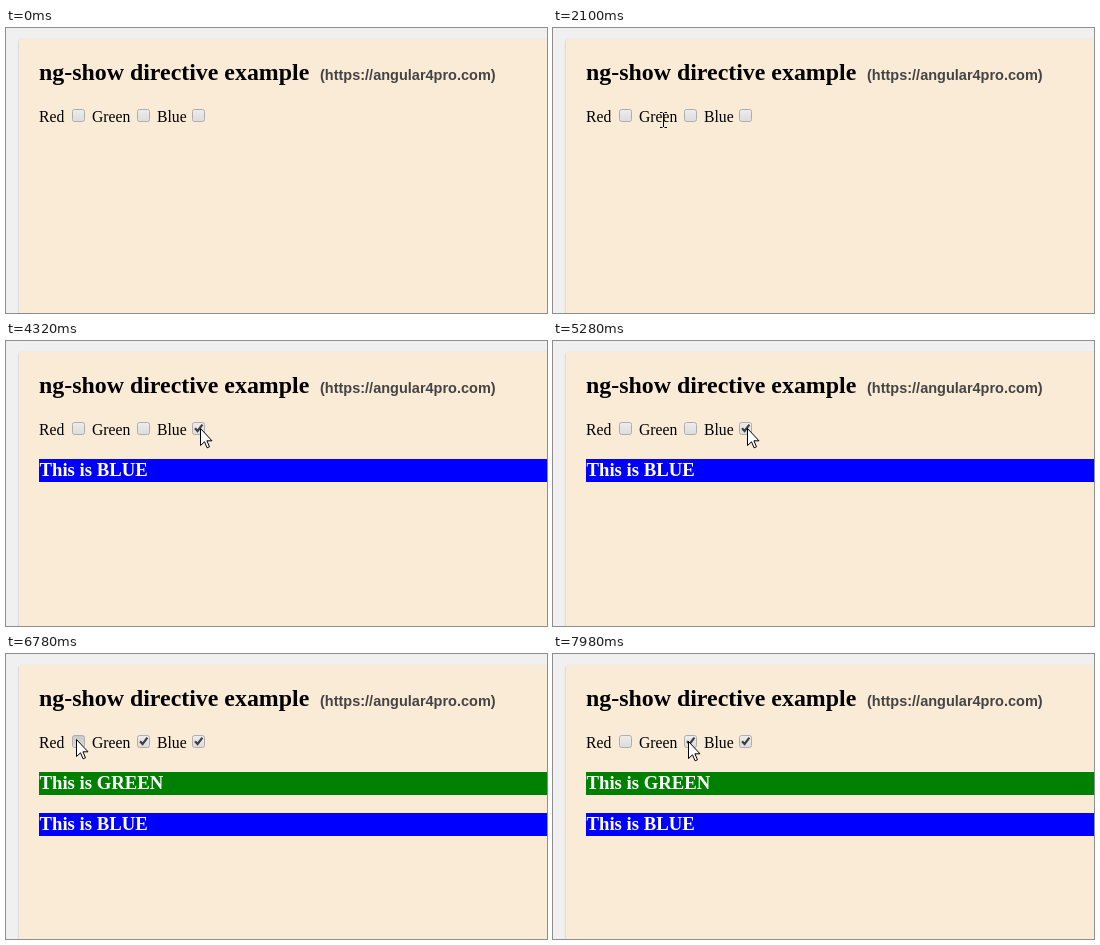
An HTML page that plays this animation: 541x285 px, repeating every 8 s.

```html
<!DOCTYPE html>
<html lang="en">
<head>
<meta charset="utf-8">
<title>ng-show directive example</title>
<style>
  html, body { margin: 0; width: 100%; height: 100%; overflow: hidden; background: #f0f0f0; }
  body { position: relative; font: 15.7px "Liberation Serif", "Times New Roman", serif; color: #000; }
  .card { position: absolute; left: 13px; top: 11px; right: -10px; bottom: -10px;
    background: #faebd7; border-radius: 2px; box-shadow: 0 1px 2px rgba(0, 0, 0, .3); }
  svg { position: absolute; left: 0; top: 0; }
  .title { font-size: 23.9px; font-weight: bold; }
  .site { font: bold 14.5px "Liberation Sans", Arial, sans-serif; fill: #444; }
  .bar text { font-size: 18.72px; font-weight: bold; fill: #fff; }
  .box { stroke: #b0aeab; }
  .tick { fill: none; stroke: #3c4043; stroke-width: 2.2; }
</style>
</head>
<body>
<div class="card"></div>
<svg width="541" height="285" viewBox="0 0 541 285">
  <defs>
    <linearGradient id="idle" x2="0" y2="1"><stop stop-color="#ededed"/><stop offset="1" stop-color="#dcdcdc"/></linearGradient>
    <linearGradient id="pressed" x2="0" y2="1"><stop stop-color="#c8c8c8"/><stop offset="1" stop-color="#dcdcdc"/></linearGradient>
  </defs>
  <text class="title" x="33" y="52">ng-show directive example</text>
  <text class="site" x="314" y="52">(https://angular4pro.com)</text>
  <g id="options"></g>
  <g id="cursor">
    <path id="arrow" d="M.5 .5v17l4-3.7 2.6 6 2.4-1-2.6-6h5.1z" fill="#fff" stroke="#000"/>
    <path id="beam" d="M-3 -7.5h2.5M1.5 -7.5h2.5M.5 -7v14M-3 7.5h2.5M1.5 7.5h2.5" fill="none" stroke="#000"/>
  </g>
</svg>
<script>
const LOOP = 8000, STEP = 60, PRESS = 120, SAG = 5;
const $ = id => document.getElementById(id);

const options = [
  { name: 'Red', color: '#f00', x: 33, box: 66 },
  { name: 'Green', color: '#008000', x: 86, box: 131 },
  { name: 'Blue', color: '#00f', x: 151, box: 186 },
];

const easeOut = k => 1 - (1 - k) ** 2;
const easeOutBack = k => 1 + 2.7 * (k - 1) ** 3 + 1.7 * (k - 1) ** 2;

// The pointer travels to each checkbox, then toggles it at the given times.
const entry = { x: 395, y: 153 };
const visits = [
  { option: 0, leave: 120, arrive: 900, x: 74, y: 88, toggles: [1200, 1740], ease: easeOutBack },
  { option: 1, leave: 1860, arrive: 2580, x: 139, y: 87, toggles: [2760, 3120] },
  { option: 2, leave: 3360, arrive: 3780, x: 194, y: 87, toggles: [4080, 4680, 5280] },
  { option: 1, leave: 5280, arrive: 5940, x: 137, y: 90, toggles: [6000] },
  { option: 0, leave: 6000, arrive: 6780, x: 70, y: 85, toggles: [6900, 7560] },
  { option: 1, leave: 7560, arrive: 7980, x: 135, y: 87, toggles: [] },
];

$('options').innerHTML = options.map(o => `
  <text x="${o.x}" y="94">${o.name}</text>
  <rect class="box" x="${o.box + .5}" y="81.5" width="12" height="12" rx="2"/>
  <path class="tick" d="M${o.box + 3} 87.2l2.6 2.8 4.8-6.3"/>
  <g class="bar">
    <rect x="33" width="508" height="23" fill="${o.color}"/>
    <text x="33.5" y="17">This is ${o.name.toUpperCase()}</text>
  </g>`).join('');
const [boxes, ticks, bars] = ['box', 'tick', 'bar'].map(c => document.getElementsByClassName(c));

const show = (el, on) => el.setAttribute('visibility', on ? 'inherit' : 'hidden');

function pointerAt(t) {
  const i = Math.max(0, visits.findLastIndex(v => v.leave <= t));
  const from = visits[i - 1] || entry, to = visits[i];
  const k = Math.min(1, Math.max(0, (t - to.leave) / (to.arrive - to.leave)));
  const e = (to.ease || easeOut)(k);
  return [
    from.x + (to.x - from.x) * e,
    from.y + (to.y - from.y) * e + SAG * Math.sin(Math.PI * e),
  ].map(Math.round);
}

function draw(t) {
  let row = 0;
  options.forEach((o, i) => {
    const toggles = visits.filter(v => v.option === i).flatMap(v => v.toggles);
    const checked = toggles.filter(at => at <= t).length % 2 === 1;
    const down = toggles.some(at => at - PRESS <= t && t < at);
    boxes[i].setAttribute('fill', `url(#${down ? 'pressed' : 'idle'})`);
    show(ticks[i], checked);
    show(bars[i], checked);
    if (checked) bars[i].setAttribute('transform', `translate(0 ${Math.round(118 + 41.4 * row++)})`);
  });

  const [x, y] = pointerAt(t);
  const overText = y >= 80 && y <= 98 && options.some(o => x >= o.x - 4 && x <= o.box - 4);
  $('cursor').setAttribute('transform', `translate(${x} ${y})`);
  show($('cursor'), t >= visits[0].leave);
  show($('arrow'), !overText);
  show($('beam'), overText);
}

function tick() {
  draw(Math.floor(performance.now() % LOOP / STEP) * STEP);
  requestAnimationFrame(tick);
}
tick();
</script>
</body>
</html>
```
